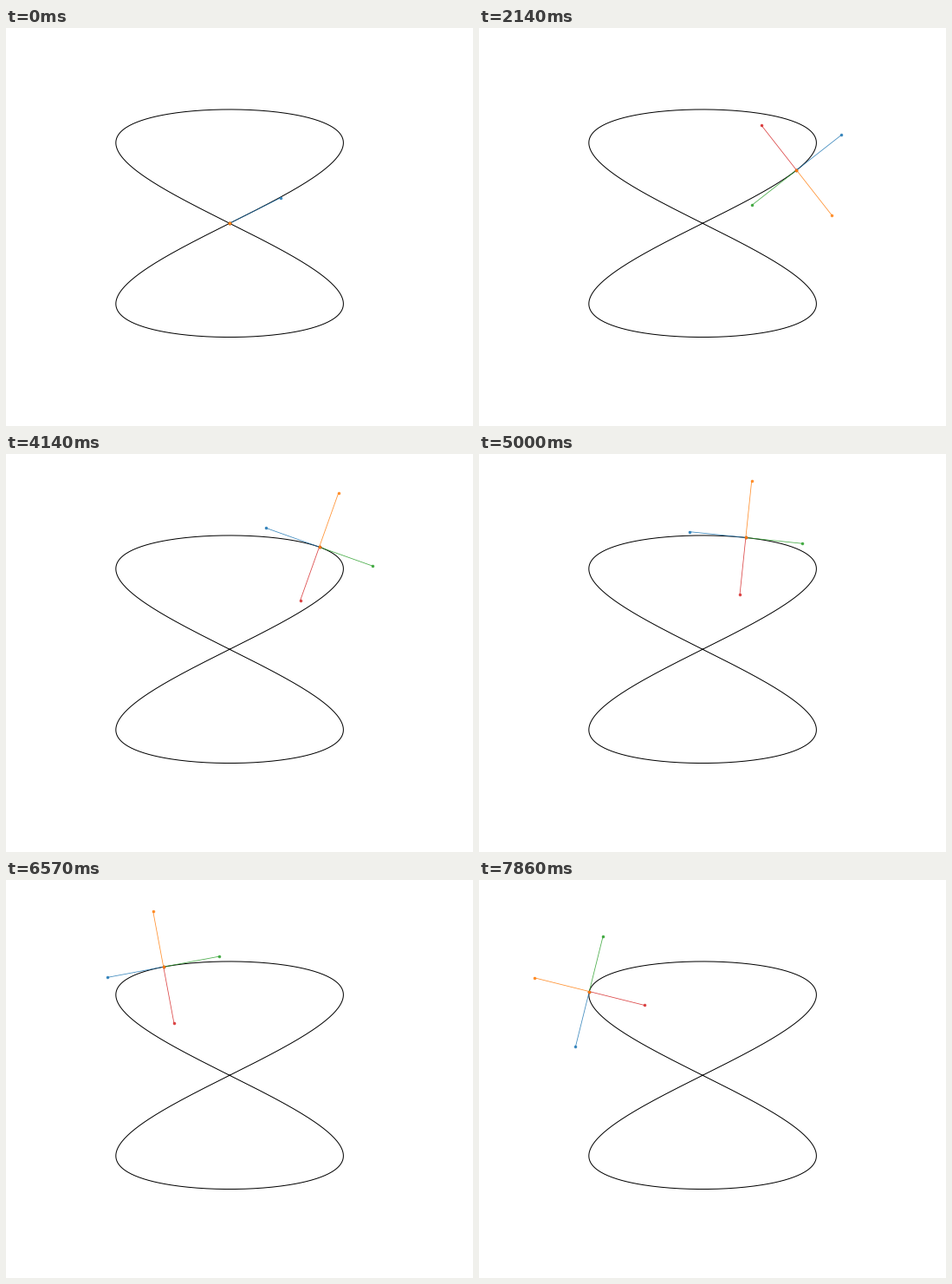
A matplotlib script for the animation above (8000 ms loop, 539x459 px).

```python
import numpy as np
import matplotlib.pyplot as plt
from matplotlib.animation import FuncAnimation

W, H, DPI = 539, 459, 64
PX = 72 / DPI                      # points per pixel
LOOP_MS, FRAMES = 8000, 200
STEPS = 56                         # visible poses in one loop
START = 5                          # poses held before the motion begins
CX, CY, R = 258.1, 225.25, 131.3   # curve centre and amplitude
ARM = R / 2

# key poses and the curve parameter reached at each
KEY_STEP = [START, 9, 29, 40, 55]
KEY_T = [0.07, 0.215, 1.117, 1.5925, 2.314]


def curve(t):
    return np.array([CX + R * np.sin(2 * t), CY - R * np.sin(t)])


def tangent(t):
    d = np.array([2 * np.cos(2 * t), -np.cos(t)])
    return d / np.hypot(*d)


fig = plt.figure(figsize=(W / DPI, H / DPI), dpi=DPI, facecolor="white")
ax = fig.add_axes([0, 0, 1, 1])
ax.set_xlim(0, W)
ax.set_ylim(H, 0)
ax.axis("off")

ax.plot(*curve(np.linspace(0, 2 * np.pi, 600)), color="black", lw=PX)


def make_arm(color):
    line, = ax.plot([], [], color=color, alpha=0.85, lw=0.8 * PX,
                    marker="o", ms=3.5 * PX, mew=0)
    return line


# drawing order leaves the orange dot on top at the shared point
forward, back, left, right = [
    make_arm(c) for c in ("tab:blue", "tab:green", "tab:red", "tab:orange")]
arms = [forward, back, left, right]


def update(frame):
    # a pose shows from the first frame that overlaps it
    step = int((frame + 0.97) * STEPS / FRAMES)
    moving = step >= START
    t = np.interp(step, KEY_STEP, KEY_T) if moving else 0
    p = curve(t)
    d = tangent(t)
    n = np.array([d[1], -d[0]])
    for arm, v in zip(arms, (d, -d, n, -n)):
        reach = ARM if moving or arm is forward else 0
        arm.set_data(*np.transpose([p, p + reach * v]))
    return arms


anim = FuncAnimation(fig, update, frames=FRAMES, interval=LOOP_MS / FRAMES,
                     init_func=lambda: update(0), repeat=True,
                     repeat_delay=0, blit=False)
plt.show()
```
